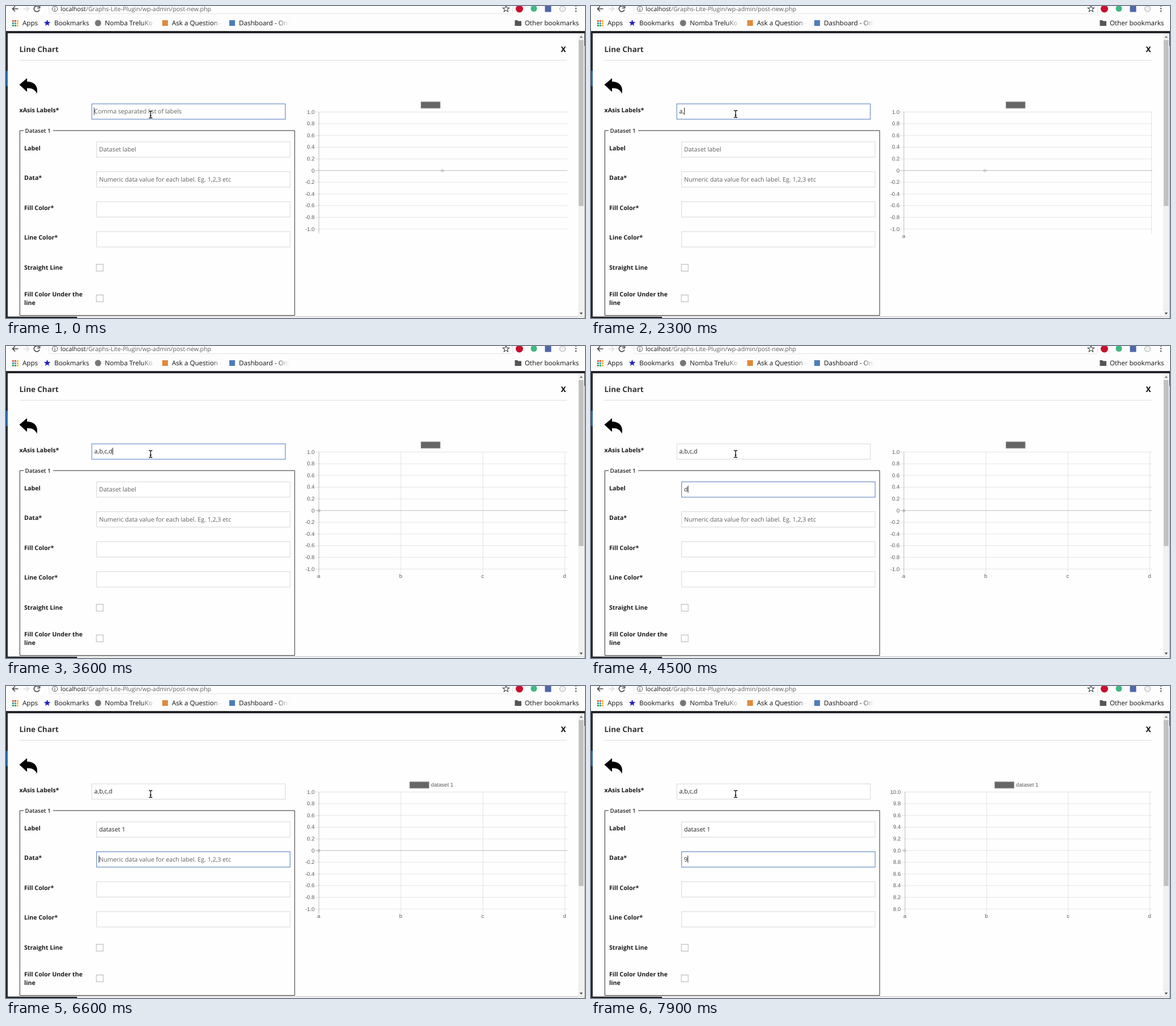
Write an HTML page that moves like this. It is 1019 px wide and 549 px high and loops after 8000 ms.

```html
<!DOCTYPE html>
<html lang="en">
<head>
<meta charset="utf-8">
<title>Line Chart</title>
<style>
  html, body { margin: 0; width: 100%; height: 100%; overflow: hidden; background: #fefefe; }
  svg { display: block; width: 100%; height: 100%; }
  text { font: 10.72px "Open Sans", "Noto Sans", sans-serif; fill: #222; white-space: pre; text-rendering: geometricPrecision; }
  .bar { font-size: 11.6px; fill: #111; }
  .url { font-size: 10.62px; fill: #5c5c5c; }
  .bold { font-size: 10.65px; font-weight: 700; fill: #1c1c1c; }
  .title { font-size: 13.4px; font-weight: 700; fill: #333; }
  .set { font-size: 9.9px; font-weight: 600; }
  .chart { font: 9.6px "Liberation Sans", Arial, sans-serif; fill: #5c5c5c; }
  .field { fill: #fff; stroke: #d8d8d8; }
  .end { text-anchor: end; }
  .mid { text-anchor: middle; }
</style>
</head>
<body>
<svg id="stage" viewBox="0 0 1019 549" preserveAspectRatio="none">
  <defs>
    <linearGradient id="fade">
      <stop offset="0" stop-color="#fdfdfd" stop-opacity="0"/>
      <stop offset="1" stop-color="#fdfdfd"/>
    </linearGradient>
  </defs>
</svg>
<script>
const LOOP = 8000, STEP = 100;
const PAPER = '#fefefe', TOOLBAR = '#fdfdfd';
const stage = document.getElementById('stage');

function add(tag, attrs, parent = stage) {
  const el = document.createElementNS('http://www.w3.org/2000/svg', tag);
  set(el, attrs);
  parent.append(el);
  return el;
}
function set(el, attrs) { for (const key in attrs) el.setAttribute(key, attrs[key]); }
const box = (x, y, width, height, fill, more) => add('rect', { x, y, width, height, fill, ...more });
const disc = (cx, cy, r, fill, more) => add('circle', { cx, cy, r, fill, ...more });
const path = (d, more) => add('path', { d, fill: 'none', ...more });
function label(x, y, str, cls, parent) {
  const el = add('text', { x, y, class: cls || '' }, parent);
  el.textContent = str;
  return el;
}

function drawBrowser() {
  box(0, 0, 1019, 44, TOOLBAR);
  box(75.5, -8, 816, 21.5, '#fff', { stroke: '#e4e4e4', rx: 2 });
  path('M21.5 5H11.5M16 .5L11.5 5L16 9.5', { stroke: '#444', 'stroke-width': 1.6 });
  path('M31 5H40M36 .5L40.5 5L36 9.5', { stroke: '#ddd', 'stroke-width': 1.6 });
  path('M58 1.5A5 5 0 1 0 59 6.5M59.5 -1V3.5H55', { stroke: '#444', 'stroke-width': 1.6 });
  disc(86, 5, 4.7, 'none', { stroke: '#555' });
  path('M86 4.3V8M86 2V3.2', { stroke: '#555', 'stroke-width': 1.2 });
  label(96, 8.5, 'localhost', 'url').style.fill = '#111';
  label(141, 8.5, '/Graphs-Lite-Plugin/wp-admin/post-new.php', 'url');
  const star = 'M0 -6L1.6 -1.9L5.8 -1.8L2.5 .9L3.6 5L0 2.6L-3.6 5L-2.5 .9L-5.8 -1.8L-1.6 -1.9Z';
  path(star, { transform: 'translate(880 5)', stroke: '#444', 'stroke-width': 1.1 });
  disc(903.5, 5, 6.5, '#c8102e');
  disc(929, 4.5, 5.5, '#41b883');
  box(948.5, 0, 11, 10.5, '#4f67a8');
  disc(979.5, 5, 5, '#f0f0f0', { stroke: '#aaa' });
  [0, 4.5, 9].forEach(y => disc(1003, y, 1.3, '#555'));

  const colors = ['#db4437', '#db4437', '#f4b400', '#0f9d58', '#4285f4', '#f4b400', '#0f9d58', '#0f9d58', '#f4b400'];
  colors.forEach((c, i) => box(11 + i % 3 * 4, 25 + Math.floor(i / 3) * 4, 2.8, 2.8, c));
  label(29, 34, 'Apps', 'bar');
  path(star, { transform: 'translate(72.5 30)', fill: '#2424c4' });
  label(85, 34, 'Bookmarks', 'bar');
  disc(162, 30, 5.5, '#777');
  label(174, 34, 'Nomba TreluKo', 'bar');
  box(275, 25, 10, 10, '#e08a3c');
  label(292, 34, 'Ask a Question -', 'bar');
  box(393, 25, 10, 10, '#4a7ebb');
  label(410, 34, 'Dashboard - Onli', 'bar');
  [[238, 25], [364, 16], [476, 22]].forEach(([x, w]) => box(x, 22, w, 18, 'url(#fade)'));
  box(263, 22, 8, 18, TOOLBAR);
  box(498, 22, 12, 18, TOOLBAR);
  path('M895.5 25H900L901.5 26.5H907V35H895.5Z', { fill: '#555' });
  label(913, 34, 'Other bookmarks', 'bar');
}

function drawPage() {
  box(0, 44, 1019, 505, '#24262a');
  box(0, 114, 3, 27, '#2a63a8');
  box(3, 48, 1015, 498.5, PAPER);
  box(125, 546.5, 894, 2.5, '#f4f4f4');
  box(1007, 48, 11, 498.5, '#f1f1f1');
  box(1008, 60, 8.5, 292, '#c1c1c1');
  box(1018, 70, 1, 479, '#aaa');
  path('M1009.5 56L1012.3 52.5L1015 56Z', { fill: '#777' });
  path('M1009.5 539.5L1012.3 543L1015 539.5Z', { fill: '#444' });
  label(23.5, 81, 'Line Chart', 'title');
  label(976.5, 81, 'X', 'title').style.fill = '#000';
  path('M24 95.5H987', { stroke: '#ddd' });
  path('M23.5 138.5L37 127V133C49 133.2 57.5 140 54.3 154.5C51.5 147.5 47 144.5 37 144.5V151Z', { fill: '#000' });
  path('M31 219.2H24.3V544.5H508V219.2H83', { stroke: '#2a2a2a' });
  label(33.5, 223, 'Dataset 1', 'set');
  label(23.5, 187, 'xAsis Labels*', 'bold');
  ['Label', 'Data*', 'Fill Color*', 'Line Color*', 'Straight Line'].forEach((s, i) =>
    label(32, 253.5 + 52.6 * i, s, 'bold'));
  label(32, 510.5, 'Fill Color Under the', 'bold');
  label(32, 525.5, 'line', 'bold');
  [454.5, 508.5].forEach(y => box(159, y, 12, 12, '#fff', { stroke: '#b4b4b4' }));
}

function makeField(x, y, hint) {
  const frame = box(x, y, 340.5, 27, '#fff', { class: 'field' });
  const text = label(x + 4.3, y + 17, '');
  const caret = box(0, y + 6.8, 1, 12.5, '#222');
  return (value, focused, blink = true) => {
    frame.style.stroke = focused ? '#6b8fc6' : '';
    frame.style.strokeWidth = focused ? 1.2 : 1;
    text.textContent = value || hint;
    text.style.fill = value ? '' : '#606060';
    const w = value ? text.getComputedTextLength() : -0.6;
    set(caret, { x: x + 4.3 + w, visibility: focused && blink ? 'visible' : 'hidden' });
  };
}

function makeChart() {
  const root = add('g', { class: 'chart' });
  const top = 186.6, gap = 20.6;
  const line = (d, a) => add('path', { d, stroke: `rgba(0,0,0,${a})`, fill: 'none' }, root);
  return ({ names, legend, big, dotX }) => {
    root.replaceChildren();
    const left = big ? 552.7 : 550.7;
    for (let i = 0; i <= 10; i++) {
      const y = top + gap * i;
      const v = (big ? 10 : 1) - 0.2 * i;
      const zero = !big && i === 5;
      line(`M${left - 7} ${y}H988`, zero ? 0.25 : 0.1);
      label(left - 7.5, y + 2.9, zero ? '0' : v.toFixed(1), 'chart end', root);
    }
    const last = names.length - 1;
    const right = names[last] ? 983.5 : 986.5;
    names.forEach((name, i) => {
      const x = last ? left + (right - left) * i / last : left;
      line(`M${x} ${top}V400.5`, i ? 0.1 : 0.25);
      label(x - 0.3, 407.8, name, 'chart mid', root);
    });
    add('circle', { cx: dotX, cy: 289.8, r: 2.5, fill: 'rgba(0,0,0,.1)', stroke: 'rgba(0,0,0,.1)' }, root);
    const caption = label(0, 177, legend, 'chart', root);
    const x = 730 - caption.getComputedTextLength() / 2;
    set(caption, { x: x + 37.6 });
    add('rect', { x: x + 0.5, y: 168.8, width: 33.5, height: 11, fill: '#666', stroke: '#858585' }, root);
  };
}

drawBrowser();
drawPage();
const labelsField = makeField(151, 172.2, 'Comma separated list of labels');
const nameField = makeField(159.5, 239, 'Dataset label');
const dataField = makeField(159.5, 291.6, 'Numeric data value for each label. Eg. 1,2,3 etc');
makeField(159.5, 344.3, '')('', false);
makeField(159.5, 397, '')('', false);
const chart = makeChart();
let wave = 'M164 259';
for (let i = 0; i < 19; i++) wave += `l2 ${i % 2 ? 1.5 : -1.5}`;
const misspelt = path(wave, { stroke: '#e03030', 'stroke-width': 0.9 });
const pointer = add('g', {});
const beam = 'M-3 -6H-1L0 -5L1 -6H3M0 -5V5M-3 6H-1L0 5L1 6H3M-1.5 2H1.5';
add('path', { d: beam, fill: 'none', stroke: '#fff', 'stroke-width': 3 }, pointer);
add('path', { d: beam, fill: 'none', stroke: '#111', 'stroke-width': 1.3 }, pointer);

// Each list holds [time, length shown] pairs.
const LABELS = 'a,b,c,d', NAME = 'dataset 1';
const typed = [[1700, 1], [2100, 2], [2400, 3], [2600, 4], [2900, 5], [3200, 6], [3500, 7]];
const plotted = [[2100, 1], [2200, 2], [2500, 3], [2700, 4], [3000, 5], [3300, 6], [3600, 7]];
const named = [[4500, 1], [4700, 2], [4900, 3], [5100, 4], [5300, 5], [5500, 6], [5800, 8], [6200, 9]];
const legends = [[4700, 2], [5100, 4], [5600, 6], [5800, 7], [5900, 8], [6400, 9]];
const shown = (str, list, t) => str.slice(0, list.reduce((n, [at, len]) => t >= at ? len : n, 0));

// Every chart update restarts a one second quartic ease-out.
function distanceLeft(t) {
  const starts = plotted.slice(1).map(([at]) => at);
  return starts.reduce((left, at, i) => {
    const run = Math.min(t, starts[i + 1] ?? LOOP) - at;
    return run > 0 ? left * Math.max(0, 1 - run / 1000) ** 4 : left;
  }, 1);
}

function update(t) {
  labelsField(shown(LABELS, typed, t), t < 3900, t < 500 || t >= 1500);
  nameField(shown(NAME, named, t), t >= 3900 && t < 6600);
  dataField(t >= 7700 ? '9' : '', t >= 6600, t < 7200 || t >= 7700);
  const big = t >= 7900;
  chart({
    names: shown(LABELS, plotted, t).split(','),
    legend: shown(NAME, legends, t),
    big,
    dotX: big ? 551.5 : 550.5 + 217.5 * distanceLeft(t)
  });
  misspelt.style.display = t >= 5800 && t < 6600 ? '' : 'none';
  set(pointer, { transform: `translate(254.5 ${t < 200 ? 191 : 190})` });
}

let drawn = -1;
function tick() {
  const t = Math.floor(performance.now() % LOOP / STEP) * STEP;
  if (t !== drawn) update(drawn = t);
  requestAnimationFrame(tick);
}
tick();
</script>
</body>
</html>
```
